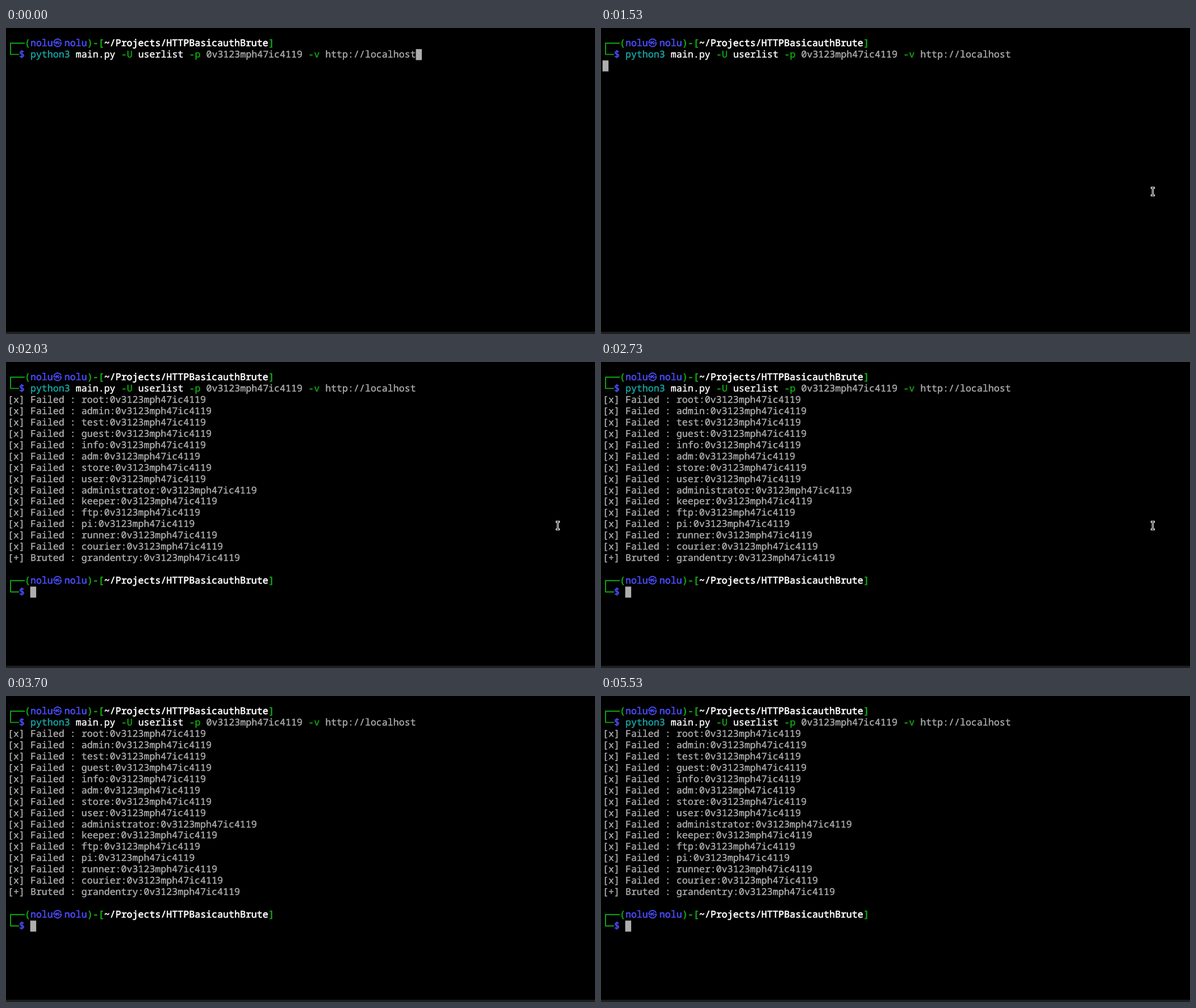
Animation of 1037 by 540 pixels, one loop 5560 ms. Source, as an HTML page with a canvas:

```html
<!DOCTYPE html>
<html lang="en">
<head>
<meta charset="utf-8">
<title>Terminal</title>
<style>
html, body { margin: 0; width: 100%; height: 100%; overflow: hidden; background: #000; }
canvas { display: block; }
</style>
</head>
<body>
<canvas id="stage" width="1037" height="540"></canvas>
<script>
const ctx = document.getElementById("stage").getContext("2d");
const LOOP = 5560, ENTER = 1530, OUTPUT = 1630, LINE_TIME = 8, DONE = 1790;
const CELL = 9.985, ROW = 19.95, LEFT = 3, TOP = 17.1, SIZE = 16.63;
const GREEN = "#12a812", BLUE = "#4b4bfa", CYAN = "#18abab", GRAY = "#aeaeae", WHITE = "#fff";
const MONO = `500 ${SIZE}px "Noto Sans Mono", "DejaVu Sans Mono", monospace`;
const CJK = `700 15.5px "Noto Sans CJK KR", "Noto Sans CJK JP", sans-serif`;
const PASSWORD = "0v3123mph47ic4119";
const users = ["root", "admin", "test", "guest", "info", "adm", "store", "user",
  "administrator", "keeper", "ftp", "pi", "runner", "courier", "grandentry"];

const colX = col => LEFT + col * CELL;
const rowY = row => TOP + row * ROW;

// A thin outline gives the strokes a medium weight.
function put(text, col, row, color, font = MONO, weight = 0.4) {
  const x = colX(col), y = rowY(row) + 14.9;
  ctx.font = font;
  ctx.fillStyle = ctx.strokeStyle = color;
  ctx.lineWidth = weight;
  ctx.fillText(text, x, y);
  ctx.strokeText(text, x, y);
}

function putBold(text, col, row, color) {
  put(text, col, row, color, MONO, 0.65);
}

function block(col, row) {
  ctx.fillStyle = GRAY;
  ctx.fillRect(colX(col) - 0.3, rowY(row) + 0.2, 10.5, 19.4);
}

function prompt(row) {
  const y = rowY(row) + 9.6;
  ctx.strokeStyle = GREEN;
  ctx.lineWidth = 1.9;
  ctx.beginPath();
  ctx.moveTo(33, y);
  ctx.lineTo(8, y);
  ctx.lineTo(8, y + ROW);
  ctx.lineTo(23, y + ROW);
  ctx.stroke();
  putBold("(", 3, row, GREEN);
  putBold("nolu", 4, row, BLUE);
  put("㉿", 8, row, BLUE, CJK);
  putBold("nolu", 10, row, BLUE);
  putBold(")-[", 14, row, GREEN);
  putBold("~/Projects/HTTPBasicauthBrute", 17, row, WHITE);
  putBold("]", 46, row, GREEN);
  putBold("$", 2, row + 1, BLUE);
}

function command() {
  put("python3", 4, 1, CYAN);
  put("main.py", 12, 1, WHITE);
  put("-U", 20, 1, GREEN);
  put("userlist", 23, 1, WHITE);
  put("-p", 32, 1, GREEN);
  put(PASSWORD, 35, 1, GRAY);
  put("-v", 53, 1, GREEN);
  put("http://localhost", 56, 1, GRAY);
}

function result(user, i) {
  const hit = i === users.length - 1;
  put(hit ? "[+]" : "[x]", 0, i + 2, GRAY);
  put(hit ? "Bruted :" : "Failed :", 4, i + 2, GRAY);
  put(`${user}:${PASSWORD}`, 13, i + 2, GRAY);
}

function pointer(t) {
  if (t < 800 || t >= 3480) return;
  const away = (1 - Math.min(1, (t - 800) / 330)) ** 3;
  const leave = Math.max(0, (t - 3300) / 180) ** 2;
  const x = 971.5 + 65 * away + 54 * leave;
  const y = 288.7 + 251 * away + 30 * leave;
  ctx.beginPath();
  ctx.moveTo(x - 2, y - 6.7);
  ctx.lineTo(x + 2, y - 6.7);
  ctx.moveTo(x, y - 6.7);
  ctx.lineTo(x, y + 6.7);
  ctx.moveTo(x - 2, y + 6.7);
  ctx.lineTo(x + 2, y + 6.7);
  ctx.lineCap = "square";
  for (const [color, width] of [["#e8e8e8", 3.3], ["#000", 0.9]]) {
    ctx.strokeStyle = color;
    ctx.lineWidth = width;
    ctx.stroke();
  }
  ctx.lineCap = "butt";
}

function draw(t) {
  ctx.textRendering = "geometricPrecision";
  ctx.lineJoin = "round";
  ctx.fillStyle = "#000";
  ctx.fillRect(0, 0, 1037, 540);
  ctx.fillStyle = "#1e1e1e";
  ctx.fillRect(0, 536, 1037, 4);

  prompt(0);
  command();
  const count = t < OUTPUT ? 0 : Math.min(users.length, 1 + Math.floor((t - OUTPUT) / LINE_TIME));
  users.slice(0, count).forEach(result);
  if (t < ENTER) block(72, 1);
  else if (t < DONE) block(0, 2 + count);
  else {
    prompt(18);
    block(4, 19);
  }
  pointer(t);
}

const start = performance.now();
function tick() {
  draw((performance.now() - start) % LOOP);
  requestAnimationFrame(tick);
}
tick();
</script>
</body>
</html>
```
